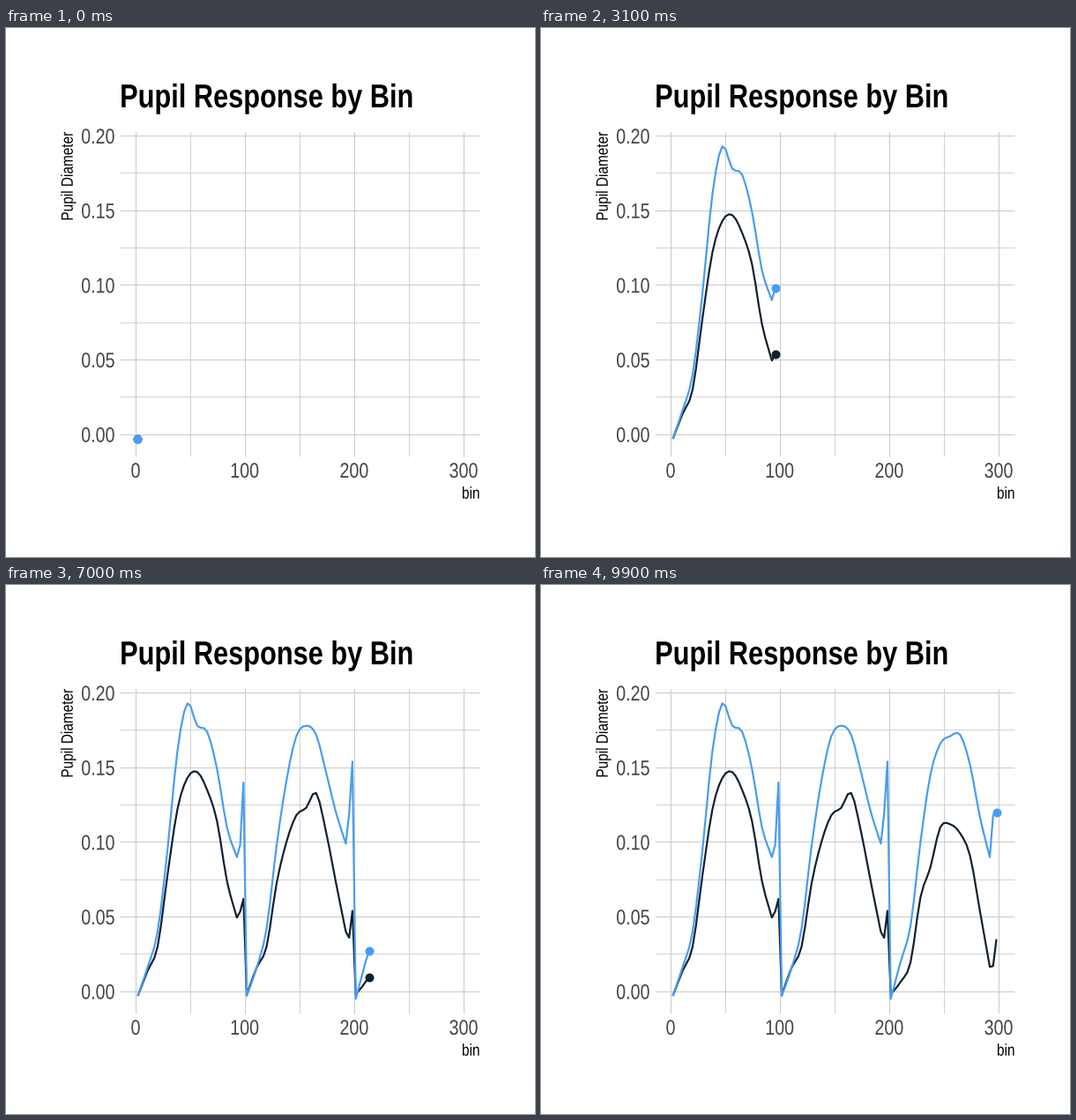
Write a matplotlib script that moves like this. It is 600 px wide and 600 px high and loops after 10 s.

```python
import numpy as np
import matplotlib.pyplot as plt
from matplotlib.animation import FuncAnimation
from matplotlib.patches import PathPatch
from matplotlib.textpath import TextPath
from matplotlib.transforms import Affine2D

SIZE, DPI = 600, 100
PX = 72 / DPI                  # one pixel in points
FRAMES, INTERVAL = 100, 100
NARROW = 0.82                  # narrow cut of the sans face
BLUE, NAVY, GREY = "#479df1", "#10202f", "#454545"
X0, BIN = 147, 1.24            # pixel of bin 0, pixels per bin
Y0, UNIT = 461, 1.693          # pixel of 0.00, pixels per 0.001
LEFT, RIGHT, TOP, BOTTOM = 129.7, 537.5, 118, 486.3
KEY = 3                        # samples between key points

# Per trial: key points of the response, then the closing upturn (x 0.001)
LIGHT = [([-3, 16.5, 40, 95, 161, 193, 178, 174, 149, 110, 90], [98, 140]),
         ([-3, 16, 42, 97, 141, 171, 178, 172, 147, 120, 99], [119, 154]),
         ([-5, 20, 44, 100, 145, 166, 171, 172, 152, 117, 90], [118, 120])]
DARK = [([-3, 14, 30, 78, 122, 143, 147, 135, 114, 74, 49.5], [53.5, 62]),
        ([-2, 16, 30, 72, 100, 118, 123, 133, 107, 73, 40], [36, 54]),
        ([-2, 6.5, 19.5, 63, 83, 110, 112, 106, 91, 54, 16.5], [17, 35])]


def smooth(keys):
    """Cubic Hermite curve through evenly spaced key points."""
    keys = np.array(keys, float)
    slope = np.gradient(keys)
    t = np.arange(KEY * (len(keys) - 1) + 1) / KEY
    i = np.minimum(t.astype(int), len(keys) - 2)
    u = t - i
    blend = u * u * (3 - 2 * u)
    return (keys[i] * (1 - blend) + keys[i + 1] * blend
            + u * (1 - u) * (slope[i] * (1 - u) - slope[i + 1] * u))


def response(trials):
    values = np.concatenate([np.append(smooth(keys), end) for keys, end in trials])
    return Y0 - UNIT * values


light, dark = response(LIGHT), response(DARK)
xs = X0 + BIN * np.linspace(2, 298, len(dark))

fig = plt.figure(figsize=(SIZE / DPI, SIZE / DPI), dpi=DPI, facecolor="white")
ax = fig.add_axes([0, 0, 1, 1])
ax.set(xlim=(0, SIZE), ylim=(SIZE, 0))
ax.axis("off")


def label(text, x, y, size, color="black", align=0.0, angle=0, weight="normal"):
    """Text on baseline y; align 0, 0.5 or 1 puts its left, middle or right at x."""
    path = TextPath((0, 0), text, size=size,
                    prop={"family": "Liberation Sans", "weight": weight})
    box = path.get_extents()
    move = (Affine2D().translate(-box.x0 - align * box.width, 0)
            .scale(NARROW, -1).rotate_deg(-angle).translate(x, y))
    ax.add_patch(PathPatch(move.transform_path(path), fc=color, lw=0, zorder=2))


def rule(x, y, major):
    ax.plot(x, y, color="#cacaca" if major else "#d2d2d2", lw=PX,
            solid_capstyle="butt", snap=False, zorder=1 if major else 0)


for i in range(7):
    x = X0 + 50 * i * BIN
    rule([int(x) + 0.5] * 2, [TOP, BOTTOM], i % 2 == 0)
    if i % 2 == 0:
        label(str(50 * i), x, 510, 24, GREY, align=0.5)

for i in range(9):
    y = Y0 - 25 * i * UNIT
    rule([LEFT, RIGHT], [int(y) + 0.5] * 2, i % 2 == 0)
    if i % 2 == 0:
        label(f"{0.025 * i:.2f}", 122.7, y + 8.6, 24, GREY, align=1)

label("Pupil Response by Bin", 131.2, 90, 37.5, weight="bold")
label("bin", 536.5, 533.7, 18.75, align=1)
label("Pupil Diameter", 75.7, 118, 18.75, align=1, angle=90)


def series(color, z):
    line, = ax.plot([], [], color=color, lw=2.2 * PX, zorder=z,
                    solid_capstyle="butt", solid_joinstyle="round")
    dot, = ax.plot([], [], "o", color=color, ms=10 * PX, mew=0, zorder=z + 2)
    return line, dot


dark_line, dark_dot = series(NAVY, 3)
light_line, light_dot = series(BLUE, 4)


def draw(frame):
    last = min(frame, len(xs) - 1)
    for line, dot, ys in ((dark_line, dark_dot, dark),
                          (light_line, light_dot, light)):
        line.set_data(xs[:last + 1], ys[:last + 1])
        dot.set_data(xs[last:last + 1], ys[last:last + 1])
    # the dark marker drops out once its bins are used up
    dark_dot.set_visible(frame < len(xs))
    return dark_line, light_line, dark_dot, light_dot


anim = FuncAnimation(fig, draw, frames=FRAMES, interval=INTERVAL,
                     repeat=True, repeat_delay=0)
plt.show()
```
